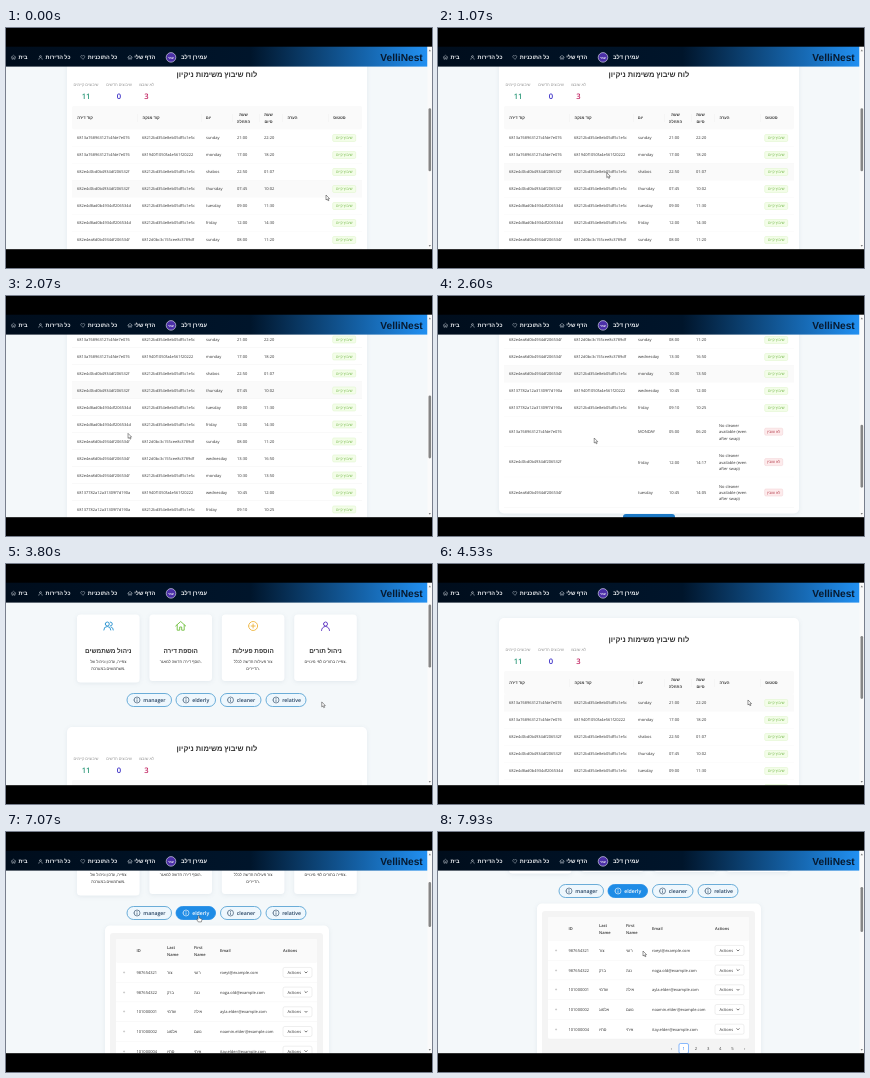
Recreate the animation shown at these times as an HTML page. Size 426 by 240 pixels, loop 8 s.

```html
<!DOCTYPE html>
<html lang="en">
<head>
<meta charset="utf-8">
<title>Care home dashboard</title>
<style>
  html, body { margin: 0; width: 100%; height: 100%; overflow: hidden; background: #000; }
  svg { display: block; width: 100vw; height: 100vh; }
  text { font-family: 'Open Sans', 'Liberation Sans', sans-serif; fill: #333; text-rendering: geometricPrecision; }
  .line { fill: none; stroke-width: .9; stroke-linecap: round; stroke-linejoin: round; }
  .pill rect { fill: #eef7fd; stroke: #4a9bd0; stroke-width: .8; }
  .pill text { fill: #24405f; }
  .pill .line { stroke: #24405f; stroke-width: .6; }
  .pill.on rect { fill: #1f8ce6; stroke: #1f8ce6; }
  .pill.on text { fill: #fff; }
  .pill.on .line { stroke: #fff; }
  .soft { filter: drop-shadow(0 1px 2px rgba(40, 80, 110, .09)); }
</style>
</head>
<body>
<svg id="stage" viewBox="0 0 426 240" xmlns="http://www.w3.org/2000/svg"></svg>
<script>
const LOOP = 8000, STEP = 1000 / 15;

// Text is placed by its vertical middle.
const text = (x, y, str, size = 4, attrs = '') =>
  `<text x="${x}" y="${y}" dy=".35em" font-size="${size}" ${attrs}>${str}</text>`;
const mid = (x, y, str, size, attrs = '') => text(x, y, str, size, `text-anchor="middle" ${attrs}`);
const box = (x, y, w, h, fill, attrs = '') =>
  `<rect x="${x}" y="${y}" width="${w}" height="${h}" fill="${fill}" ${attrs}/>`;
const icon = (x, y, d, color, scale = 1) =>
  `<path class="line" d="${d}" stroke="${color}" transform="translate(${x} ${y}) scale(${scale})"/>`;
const rule = (x, y, w) => box(x, y, w, .4, '#f1f1f1');
const BOLD = 'font-weight="600"';

const shapes = {
  user: 'M-2-2a2 2 0 1 0 4 0a2 2 0 1 0-4 0M-4 4.5a4 4 0 0 1 8 0',
  users: 'M-3-2a2 2 0 1 0 4 0a2 2 0 1 0-4 0M-4.5 4a3.5 3.5 0 0 1 7 0M2-4a2 2 0 0 1 0 4M3 1a3 3 0 0 1 2 3',
  house: 'M-5 0L0-4.5L5 0M-3.5-1V4.2H-1V1H1V4.2H3.5V-1',
  plus: 'M-4.5 0a4.5 4.5 0 1 0 9 0a4.5 4.5 0 1 0-9 0M-2 0H2M0-2V2',
  heart: 'M0 4L-4 0C-6-3-2-6 0-2.5C2-6 6-3 4 0Z',
  info: 'M-3 0a3 3 0 1 0 6 0a3 3 0 1 0-6 0M0-.2V1.5M0-1.5V-1.4',
  down: 'M-1.3-.6L0 .7L1.3-.6'
};

const actionCards = [
  ['users', '#2490cf', 'ניהול משתמשים', 'צפייה, עדכון וניהול של', 'משתמשים במערכת.'],
  ['house', '#70c03f', 'הוספת דירה', 'הוסף דירה חדשה למאגר.', ''],
  ['plus', '#efb53d', 'הוספת פעילות', 'צור פעילות חדשה לכלל', 'הדיירים.'],
  ['user', '#5a2fc0', 'ניהול תורים', 'צפייה בתורים לפי מינויים.', '']
].map(([shape, color, title, first, second], i) => {
  const x = 71 + 72.4 * i, c = x + 31.3;
  return box(x, 50.5, 62.6, 68 - (i ? 1.5 : 0), '#fff', 'rx="3.5" class="soft"') +
    icon(c, 62, shapes[shape], color) + mid(c, 87, title, 6.4, BOLD) +
    mid(c, 98, first, 4) + mid(c, 104.3, second, 4);
}).join('');

const pills = [['manager', 121, 44.5], ['elderly', 170, 39.5], ['cleaner', 214.5, 40.5], ['relative', 260, 40]];
const pillRow = pills.map(([name, x, w]) =>
  `<g class="pill" id="${name}">${box(x, 129.5, w, 13, 'none', 'rx="6.5"')}
   ${icon(x + 10, 136, shapes.info, '')}${text(x + 16.2, 136, name, 5.2, BOLD)}</g>`).join('');

const flats = ['6813a768963127c4fde7e076', '682e4c0bd0b4934df206532f', '682e4d8ad0b4934df206534d',
  '682e4ea8d0b4934df206534f', '68137782a12a31309f7d190a'];
const cleaners = ['68212bd354e8eb05df5c1e5c', '681940f1050fa4e561f20222', '6812d0bc3c155cee8c3789df'];
// flat, cleaner, day, start, end
const tasks = `0 0 sunday 21:00 22:20|0 1 monday 17:00 18:20|1 0 shabos 22:50 01:07|1 0 thursday 07:45 10:02
|2 0 tuesday 09:00 11:30|2 0 friday 12:00 14:30|3 2 sunday 08:00 11:20|3 2 wednesday 13:30 16:50
|3 0 monday 10:30 13:50|4 1 wednesday 10:45 12:00|4 0 friday 09:10 10:25|0 - MONDAY 05:00 06:20
|1 - friday 12:00 14:17|3 - tuesday 10:45 14:05`.split('|').map(s => s.trim().split(' '));
const FILLED = 11, TOP = 239.5;
const rowTop = i => TOP + 17 * Math.min(i, FILLED) + 30.4 * Math.max(0, i - FILLED);

const taskRows = tasks.map(([flat, cleaner, day, start, end], i) => {
  const top = rowTop(i), bottom = rowTop(i + 1), y = (top + bottom) / 2, open = i >= FILLED;
  const tag = open ? ['#fdebec', '#f1cfd2', '#b5404f', 'לא שובץ', 18] : ['#f3fde8', '#dcf3c8', '#74b84a', 'שיבוץ קיים', 23];
  const note = ['No cleaner', 'available (even', 'after swap)'];
  return box(66, top, 290, bottom - top, '#fff', 'class="row"') + rule(66, bottom - .4, 290) +
    text(71, y, flats[flat], 3.95) + (open ? '' : text(136, y, cleaners[cleaner], 3.95)) +
    text(200, y, day) + text(231, y, start) + text(258, y, end) +
    (open ? note.map((s, k) => text(281, y + (k - 1) * 6.4, s)).join('') : '') +
    box(326.7, y - 3.5, tag[4], 7, tag[0], `rx="1.2" stroke="${tag[1]}" stroke-width=".5"`) +
    mid(326.7 + tag[4] / 2, y, tag[3], 3.8, `style="fill:${tag[2]}"`);
}).join('');

const stats = [[80, 'שיבוצים קיימים', 11, '#2f9b7c'], [113, 'שיבוצים חדשים', 0, '#3326c4'], [140.5, 'לא שובצו', 3, '#c0205f']]
  .map(([x, label, n, color]) => mid(x, 195, label, 4, 'style="fill:#969696"') +
    mid(x, 206, n, 7.6, `${BOLD} style="fill:${color}"`)).join('');

const heads = [[79, 'קוד דירה'], [145, 'קוד מנקה'], [202.5, 'יום'], [286.5, 'הערה'], [333.5, 'סטטוס']]
  .map(([x, s]) => mid(x, 228, s, 4, BOLD)).join('') +
  [[237.5, 'שעת', 'התחלה'], [262.5, 'שעת', 'סיום']].map(([x, a, b]) =>
    mid(x, 224.6, a, 4, BOLD) + mid(x, 231.2, b, 4, BOLD)).join('') +
  [131, 195, 226, 253, 276, 322].map(x => box(x, 224, .4, 8, '#eee')).join('');

const schedule = box(61, 163, 300, 360.5, '#fff', 'rx="5" class="soft"') +
  mid(211, 184, 'לוח שיבוץ משימות ניקיון', 7.5, BOLD) + stats +
  box(66, 216, 290, 23.5, '#fafafa', 'rx="2"') + heads + taskRows +
  box(185, 524, 52, 14, '#1c78c4', 'rx="3"');

const people = [
  ['987654321', 'צור', 'רועי', 'roeyt@example.com'],
  ['987654322', 'ברק', 'נגה', 'noga.old@example.com'],
  ['101000001', 'שדמי', 'אילה', 'ayla.elder@example.com'],
  ['101000002', 'אלמוג', 'נועם', 'noamin.elder@example.com'],
  ['101000004', 'סתיו', 'איתי', 'itay.elder@example.com']
];
const peopleRows = people.map(([id, last, first, email], i) => {
  const y = 195.4 + 19.7 * i;
  return rule(110, y + 9.6, 201) + mid(118, y, '+', 4.5, 'style="fill:#888"') + text(130.5, y, id) +
    text(161, y, last) + text(188, y, first) + text(214, y, email) +
    box(277, y - 5, 29, 10, '#fff', 'rx="1.8" stroke="#dcdcdc" stroke-width=".5"') +
    text(281.5, y, 'Actions') + icon(300, y, shapes.down, '#555', .9);
}).join('');
const pager = ['‹', 1, 2, 3, 4, 5, '›'].map((s, i) =>
  mid(233.5 + 12.2 * i, 293.5, s, 4.2, `style="fill:${i === 1 ? '#1677ff' : '#444'}"`)).join('');
const residents = box(99, 148.5, 224, 160, '#fff', 'rx="5" class="soft"') +
  box(104, 156, 213, 147, '#f4f4f4', 'rx="3"') + box(110, 162, 201, 122, '#fff', 'rx="2"') +
  box(110, 162, 201, 24, '#fafafa', 'rx="2"') +
  text(130.5, 174, 'ID', 4, BOLD) + text(277, 174, 'Actions', 4, BOLD) + text(214, 174, 'Email', 4, BOLD) +
  [[161, 'Last'], [188, 'First']].map(([x, s]) => text(x, 170.8, s, 4, BOLD) + text(x, 177.4, 'Name', 4, BOLD)).join('') +
  peopleRows + box(241, 288.5, 9.5, 10, '#fff', 'rx="1.5" stroke="#1677ff" stroke-width=".5"') + pager;

const WHITE = 'style="fill:#f2f5f8" font-weight="600"';
const navBar = box(0, 18, 421.5, 20.6, 'url(#nav)') +
  [[17, 7.5, 'בית', 'house'], [52, 34.5, 'כל הדירות', 'user'], [96.5, 76.8, 'כל התוכניות', 'heart'], [138.7, 124, 'הדף שלי', 'house']]
    .map(([x, ix, s, shape]) => mid(x, 29, s, 5.5, WHITE) + icon(ix, 29.3, shapes[shape], '#dfe6ee', .45)).join('') +
  `<circle cx="165" cy="29.4" r="4.8" fill="#4b2fa8" stroke="#e8e8f4" stroke-width=".6"/>` +
  mid(165, 29.4, 'עמי', 3.4, WHITE) + mid(188, 29, 'עמירן דלב', 5.7, WHITE) +
  mid(395.5, 29, 'VelliNest', 10.2, `style="fill:#071a30;font-family:'Liberation Sans',sans-serif" font-weight="700"`);

const stage = document.getElementById('stage');
stage.innerHTML = `
  <defs><linearGradient id="nav">
    <stop offset="0" stop-color="#000d1c"/><stop offset=".58" stop-color="#00152b"/><stop offset="1" stop-color="#2190f2"/>
  </linearGradient></defs>
  ${box(0, 18, 426, 204, '#f4f8fa')}
  <g id="page">${actionCards}${pillRow}<g id="schedule">${schedule}</g><g id="residents">${residents}</g></g>
  ${navBar}
  ${box(421.5, 18, 4.5, 204, '#fafafa')}
  <path d="M422.7 23.2L423.8 21.5L424.9 23.2Z" fill="#777"/>
  <path d="M422.7 217L423.8 218.7L424.9 217Z" fill="#777"/>
  ${box(422.5, 41, 2.6, 63, '#858585', 'id="thumb" rx="1.3"')}
  <g id="cursor" stroke="#333" stroke-width=".5" stroke-linejoin="round" fill="#fff">
    <path id="arrow" d="M0 0V5L1.2 4L2 5.8L2.9 5.4L2.1 3.7H3.6Z"/>
    <path id="hand" d="M-.6 0Q0-.7.6 0V2.2L2.8 2.8Q3.4 3 3.2 4L2.7 6H-.4L-2 3.6Q-1.8 2.7-.6 3.6Z"/>
  </g>
  ${box(0, 0, 426, 18.7, '#000')}${box(0, 221.2, 426, 18.8, '#000')}`;

const el = id => document.getElementById(id);
const rows = [...document.querySelectorAll('.row')];

// Keys are [time, ...values]; each stretch eases in and out.
const scrollKeys = [[0, 138], [1250, 138], [1580, 168], [1800, 168], [2590, 306], [2680, 306], [3450, 0],
  [3820, 0], [4200, 109], [4600, 109], [5150, 55], [7350, 55], [7900, 77], [8000, 77]];
const cursorKeys = [[0, 320, 167], [850, 190, 148], [1500, 108, 135], [1850, 112, 136], [2550, 156, 142], [2800, 158, 142],
  [3700, 316, 138], [4500, 310, 136], [5200, 302, 132], [6050, 234, 82], [6300, 234, 82], [6600, 192, 82],
  [6950, 192, 82], [7800, 205, 119], [8000, 205, 119]];
const SELECT_AT = 6750;
const HOVER_LAG = 360; // row highlight trails the scrolling

function sample(keys, t) {
  const i = keys.findIndex(k => k[0] > t);
  const [a, b] = [keys[i - 1], keys[i]];
  const u = (t - a[0]) / (b[0] - a[0]), e = u * u * (3 - 2 * u);
  return a.slice(1).map((v, k) => v + (b[k + 1] - v) * e);
}

function draw(now) {
  const t = Math.floor((now % LOOP + 10) / STEP) * STEP % LOOP;
  const [scroll] = sample(scrollKeys, t), [x, y] = sample(cursorKeys, t);
  const selected = t >= SELECT_AT, docY = y + scroll;
  const hoverY = y + sample(scrollKeys, Math.max(0, t - HOVER_LAG))[0];

  el('page').setAttribute('transform', `translate(0 ${-scroll})`);
  el('schedule').setAttribute('transform', `translate(0 ${selected ? 165 : 0})`);
  el('residents').style.display = selected ? '' : 'none';
  el('thumb').setAttribute('y', selected ? 38 + .22 * scroll : 40.5 + .288 * scroll);
  el('thumb').setAttribute('height', selected ? 45 : 63);

  let overPill = false;
  for (const [name, px, w] of pills) {
    const over = x > px && x < px + w && docY > 129 && docY < 143;
    overPill = overPill || over;
    el(name).classList.toggle('on', over || selected && name === 'elderly');
  }
  rows.forEach((row, i) => {
    const over = !selected && x > 66 && x < 356 && hoverY >= rowTop(i) && hoverY < rowTop(i + 1);
    row.setAttribute('fill', over ? '#fafafa' : '#fff');
  });

  el('cursor').setAttribute('transform', `translate(${x} ${y})`);
  el('arrow').style.display = overPill ? 'none' : '';
  el('hand').style.display = overPill ? '' : 'none';
}

function tick() {
  draw(performance.now());
  requestAnimationFrame(tick);
}
tick();
</script>
</body>
</html>
```
